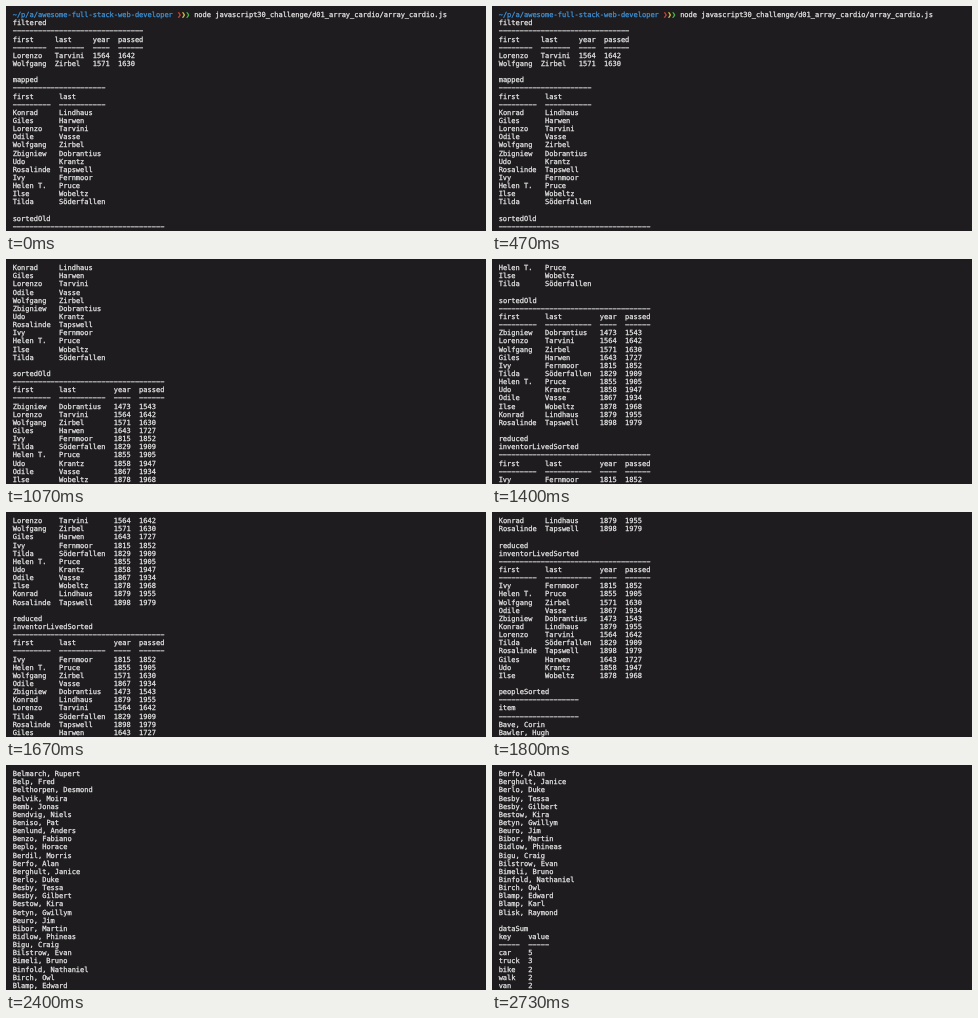
Write an HTML page that moves like this. It is 480x225 px and loops after 4.19 s.

```html
<!DOCTYPE html>
<html lang="en">
<head>
<meta charset="utf-8">
<title>Terminal output</title>
<style>
  html, body { margin: 0; width: 100%; height: 100%; overflow: hidden; background: #1e1c1f; }
  svg { display: block; width: 100%; height: 100%; }
  text {
    font: 7.01px "DejaVu Sans Mono", "Liberation Mono", monospace;
    white-space: pre;
    text-rendering: geometricPrecision;
    fill: #e9e9e9;
    stroke: #e9e9e9;
    stroke-width: .25px;
  }
</style>
</head>
<body>
<svg id="screen" viewBox="0 0 480 225" xmlns="http://www.w3.org/2000/svg"></svg>
<script>
const LOOP = 4190, STEP = 200 / 3;
const LEFT = 6.7, CHAR = 4.22, BASE = 11.2, PITCH = 8.14, VISIBLE = 27;

const inventors = [
  ['Konrad', 'Lindhaus', 1879, 1955],
  ['Giles', 'Harwen', 1643, 1727],
  ['Lorenzo', 'Tarvini', 1564, 1642],
  ['Odile', 'Vasse', 1867, 1934],
  ['Wolfgang', 'Zirbel', 1571, 1630],
  ['Zbigniew', 'Dobrantius', 1473, 1543],
  ['Udo', 'Krantz', 1858, 1947],
  ['Rosalinde', 'Tapswell', 1898, 1979],
  ['Ivy', 'Fernmoor', 1815, 1852],
  ['Helen T.', 'Pruce', 1855, 1905],
  ['Ilse', 'Wobeltz', 1878, 1968],
  ['Tilda', 'Söderfallen', 1829, 1909]
];

const people = `Bave, Corin
Bawler, Hugh
Beadmor, Edmund
Bealham, Theo
Bearsby, Clive
Bechstorf, Dieter
Bedol, Avshalom
Befort, Mathieu
Begrow, Neil
Bel-Horami, Yoram
Beldwick, Gerald
Belhurst, Simon
Belmarch, Rupert
Belp, Fred
Belthorpen, Desmond
Belvik, Moira
Bemb, Jonas
Bendvig, Niels
Beniso, Pat
Benlund, Anders
Benzo, Fabiano
Beplo, Horace
Berdil, Morris
Berfo, Alan
Berghult, Janice
Berlo, Duke
Besby, Tessa
Besby, Gilbert
Bestow, Kira
Betyn, Gwillym
Beuro, Jim
Bibor, Martin
Bidlow, Phineas
Bigu, Craig
Bilstrow, Evan
Bimeli, Bruno
Binfold, Nathaniel
Birch, Owl
Blamp, Edward
Blamp, Karl
Blisk, Raymond`.split('\n').map(name => [name]);

// The wide minus sign makes the near-solid rules of the terminal font.
const rule = n => '\u2212'.repeat(n);

function table(title, heads, data, ruled = true) {
  const widths = heads.map((head, c) =>
    [head, ...data.map(row => row[c])].reduce((w, cell) => w < String(cell).length ? String(cell).length : w, 0));
  const line = cells => cells.map((cell, c) => String(cell).padEnd(widths[c])).join('  ').trimEnd();
  const bars = line(widths.map(rule));
  return [title, ...(ruled ? [rule(bars.length)] : []), line(heads), bars, ...data.map(line), ''];
}

const sortBy = key => [...inventors].sort((a, b) => key(a) - key(b));
const columns = ['first', 'last', 'year', 'passed'];

const lines = [
  '',
  ...table('filtered', columns, inventors.filter(p => p[2] >= 1500 && p[2] < 1600)),
  ...table('mapped', columns.slice(0, 2), inventors.map(p => p.slice(0, 2))),
  ...table('sortedOld', columns, sortBy(p => p[2])),
  'reduced',
  ...table('inventorLivedSorted', columns, sortBy(p => p[3] - p[2])),
  ...table('peopleSorted', ['item'], people),
  ...table('dataSum', ['key', 'value'], [['car', 5], ['truck', 3], ['bike', 2], ['walk', 2], ['van', 2]], false)
];

const prompt = [
  [0, '~/p/a/awesome-full-stack-web-developer', '#3f93d8'],
  [39, '❯', '#e0443e'],
  [40, '❯', '#e5c93f'],
  [41, '❯', '#4fc04c'],
  [43, 'node javascript30_challenge/d01_array_cardio/array_cardio.js', '#e9e9e9']
];

const screen = document.getElementById('screen');

function add(tag, parent, attrs, content = '') {
  const el = document.createElementNS('http://www.w3.org/2000/svg', tag);
  for (const name in attrs) el.setAttribute(name, attrs[name]);
  el.textContent = content;
  return parent.appendChild(el);
}

add('rect', screen, { width: 480, height: 225, fill: '#1e1c1f' });
// An imperceptible turn keeps the browser from snapping baselines to whole pixels.
const page = add('g', screen, { transform: 'rotate(.01)' });
const rows = lines.map(line => add('text', page, { x: LEFT }, line));
for (const [col, str, color] of prompt)
  add('tspan', rows[0], { x: LEFT + col * CHAR, fill: color, stroke: color }, str);

// Scroll path: [tick, first visible line]
const path = [[11, 0], [12, 1], [16, 12], [21, 21], [25, 30], [31, 57], [41, 87]];

function topLine(t) {
  const tick = Math.floor((t + 4) / STEP);
  if (tick <= path[0][0]) return 0;
  const i = path.findIndex(p => tick <= p[0]);
  if (i < 0) return 87;
  const [k0, a] = path[i - 1], [k1, b] = path[i];
  let u = (tick - k0) / (k1 - k0);
  if (i === path.length - 1) u = 1 - (1 - u) ** 1.5;
  return Math.round(a + (b - a) * u);
}

let shown = -1;
function draw(t) {
  const top = topLine(t);
  if (top === shown) return;
  shown = top;
  rows.forEach((el, i) => {
    const r = i - top;
    el.setAttribute('display', r >= 0 && r < VISIBLE ? 'inline' : 'none');
    el.setAttribute('y', BASE + r * PITCH);
  });
}

const start = performance.now();
function tick(now) {
  draw((now - start + LOOP) % LOOP);
  requestAnimationFrame(tick);
}
draw(0);
requestAnimationFrame(tick);
</script>
</body>
</html>
```
